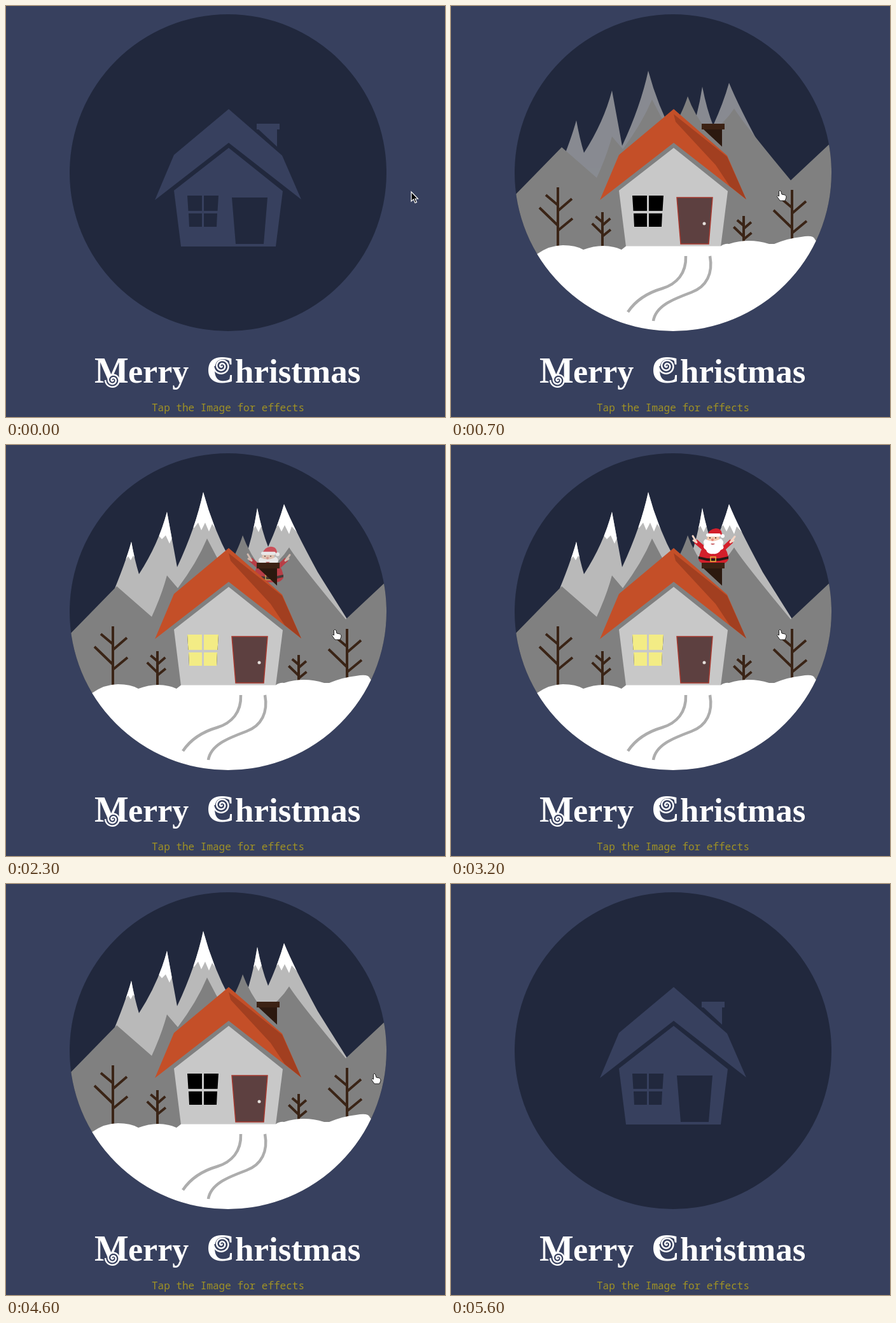
These frames come from a looping animation (690 px wide and 646 px high, 6300 ms). An HTML page:

```html
<!DOCTYPE html>
<html lang="en">
<head>
<meta charset="utf-8">
<title>Merry Christmas</title>
<style>
  html, body { margin: 0; width: 100%; height: 100%; overflow: hidden; background: #37405e; }
  svg { display: block; width: 100%; height: 100%; }
  .title { font-family: "Liberation Serif", serif; font-weight: bold; fill: #fff; }
  .hint { font: 16px "Noto Sans Mono", monospace; fill: #a09224; }
</style>
</head>
<body>
<svg viewBox="0 0 690 646">
  <defs>
    <clipPath id="disc"><circle cx="349" cy="262" r="249"/></clipPath>
    <path id="range" d="M165 240Q188 185 197 152Q202 180 209 203Q240 155 253 105L269 192Q298 130 310 74Q325 130 352 180L372 190Q388 145 395 99Q402 135 412 160Q428 125 437 93Q452 130 490 200L537 275V320H165Z"/>
    <clipPath id="rangeClip"><use href="#range"/></clipPath>
    <path id="roof" d="M350 162L434 235L464 304L350 215L234 305L264 234Z"/>
    <path id="wall" d="M350 223L435 291L424 378H275L264 290Z"/>
    <path id="chimney" d="M394 185H430V194H426V221L397 194H394Z"/>
    <path id="panes" d="M285 298H308V322H286.500ZM311 298H334L332.500 322H311ZM287 326H308V347H288ZM311 326H332L331 347H311Z"/>
    <path id="door" d="M355 301H411L405 374H361Z"/>
    <g id="tree" fill="none" stroke="#3a2416" stroke-width="4">
      <path vector-effect="non-scaling-stroke" d="M0 0V95M-19 12L0 28M-29 32L0 60M22 18L0 37M23 49L0 68"/>
    </g>
  </defs>

  <rect width="690" height="646" fill="#37405e"/>
  <circle cx="349" cy="262" r="249" fill="#21283d"/>

  <!-- unlit house -->
  <g fill="#37405e">
    <use href="#chimney"/><use href="#roof"/><use href="#wall"/>
    <g fill="#21283d"><use href="#panes"/><use href="#door"/></g>
  </g>

  <g clip-path="url(#disc)">
    <g id="scene">
      <g id="peaks">
        <use href="#range" fill="#b9b9b9"/>
        <g id="caps" clip-path="url(#rangeClip)" fill="#fff">
          <path d="M185 150H210L206 182L200 174L196 181L192 175L188 180Z"/>
          <path d="M235 100H270L267 158L261 146L257 155L251 142L245 148L238 140Z"/>
          <path d="M285 70H335V140L324 124L319 136L313 122L307 134L302 122L296 130L285 126Z"/>
          <path d="M380 95H410V142L401 128L397 137L392 127L387 134L380 128Z"/>
          <path d="M418 90H460L462 142L449 128L445 140L438 126L433 136L428 126L418 134Z"/>
        </g>
      </g>
      <path fill="#808080" d="M95 303L174 222L229 270Q245 235 253 205L270 225Q300 185 316 147Q330 175 345 200Q365 165 372 142Q382 170 405 200Q430 185 445 161Q460 185 534 274L600 212V420H95Z"/>
      <use href="#tree" x="168" y="285"/>
      <use href="#tree" x="536" y="289"/>
      <use href="#tree" transform="translate(238 324) scale(.56)"/>
      <use href="#tree" transform="translate(460 330) scale(.54)"/>

      <g id="santa">
        <path d="M398 163L384 151M428 163L441 151" stroke="#d31f2b" stroke-width="7"/>
        <path d="M386 153L380 143M386 153L381 150M439 153L446 144M439 153L444 150" stroke="#f6d5c5" stroke-width="3" stroke-linecap="round"/>
        <path d="M399 156H426Q436 167 436 180Q433 186 425 187H400Q391 186 389 180Q391 166 399 156Z" fill="#d31f2b"/>
        <path d="M389 175Q412 182 436 175V179Q412 186 389 179Z" fill="#251815"/>
        <rect x="408" y="176" width="8" height="7" fill="none" stroke="#e4b73c" stroke-width="1.500"/>
        <circle cx="412" cy="148" r="10" fill="#f4c7ad"/>
        <path d="M400 148Q405 151 411 151Q418 151 424 147Q430 151 427 157Q431 163 424 165Q420 172 412 171Q403 172 401 165Q395 162 398 156Q395 151 400 148Z" fill="#fff"/>
        <path d="M403 143Q405 132 416 131Q426 131 426 142Z" fill="#d31f2b"/>
        <rect x="401" y="139" width="23" height="5" rx="2.500" fill="#fff"/>
        <circle cx="427" cy="143" r="3" fill="#fff"/>
        <circle cx="411" cy="149" r="2" fill="#e58a7c"/>
        <path d="M408 155Q411 158 415 155" fill="#b32b30"/>
        <path d="M406 146H408M415 146H417" stroke="#33231f" stroke-width="1.500"/>
      </g>

      <use href="#chimney" fill="#2c190f"/>
      <rect x="394" y="185" width="36" height="9" fill="#3c2214"/>
      <use href="#roof" fill="#c44f28"/>
      <path fill="#a23f20" d="M350 170L434 237L464 304L438 283L416 250L353 182Z"/>
      <use href="#wall" fill="#c8c8c8"/>
      <use href="#panes"/>
      <use href="#panes" id="light" fill="#f3ec85"/>
      <use href="#door" fill="#5d4040" stroke="#a8392f" stroke-width="1.500"/>
      <circle cx="398" cy="342" r="2.500" fill="#e6e0dc"/>

      <path fill="#fff" d="M100 420L135 390Q155 376 176 376Q196 376 208 383Q240 371 268 383L275 377.500H424Q430 373 437 374Q468 364 500 374L508 374Q530 365 550 363Q570 359 572 367L600 400V520H100Z"/>
      <path fill="none" stroke="#adadad" stroke-width="4.500" d="M369 393C370 420 355 437 332 444C308 451 290 463 278 481M407 393C412 420 402 441 378 450C352 460 322 470 318 495"/>
    </g>
  </g>

  <text class="title" y="592">
    <tspan x="139" font-size="57">M</tspan><tspan x="192" font-size="52">erry</tspan>
    <tspan x="315" font-size="62">C</tspan><tspan x="360" font-size="53">hristmas</tspan>
  </text>
  <g fill="#37405e" stroke="#fff" stroke-width="2.500">
    <path class="curl" data-x="168" data-y="588" data-r="12"/>
    <path class="curl" data-x="339" data-y="566" data-r="13"/>
  </g>
  <text class="hint" x="229" y="637">Tap the Image for effects</text>

  <g id="cursor">
    <path id="arrow" d="M0 0V15L3.500 11.800L6 17.500L8.500 16.400L6 11H10.500Z" stroke="#fff" stroke-width="1.200"/>
    <path id="hand" fill="#fff" stroke="#222" d="M-1.500 1Q0 -1 1.500 1L3 6L8 7Q10 8 10 11L8 16H0L-4.500 9.500Q-4 7 -1.500 9Z"/>
  </g>
</svg>

<script>
const LOOP = 6300, STEP = 100, DROP = 88;
const $ = id => document.getElementById(id);

const clamp = v => Math.max(0, Math.min(1, v));
const ramp = (t, from, to) => clamp((t - from) / (to - from));
const ease = p => 1 - (1 - p) ** 2;

// Rises during the first interval and falls during the second.
const pulse = (t, inFrom, inTo, outFrom, outTo) =>
  ease(ramp(t, inFrom, inTo)) * (1 - ease(ramp(t, outFrom, outTo)));

// time, x, y of the pointer tip
const route = [[100, 637, 292], [600, 517, 290], [4200, 517, 290], [4600, 579, 298], [5100, 652, 283]];

function pointerAt(t) {
  let [, x, y] = route[0];
  for (let i = 1; i < route.length; i++) {
    const [t0, x0, y0] = route[i - 1], [t1, x1, y1] = route[i];
    const p = ramp(t, t0, t1);
    x += (x1 - x0) * p;
    y += (y1 - y0) * p;
  }
  return [x, y];
}

function rise(el, p) {
  el.setAttribute("transform", `translate(0 ${DROP * (1 - p)})`);
  el.setAttribute("opacity", p);
}

function render(t) {
  $("scene").setAttribute("opacity", pulse(t, 200, 600, 4700, 5200));
  rise($("peaks"), pulse(t, 350, 1150, 4700, 5200));
  $("caps").setAttribute("opacity", pulse(t, 900, 1400, 4700, 5000));
  $("light").setAttribute("opacity", pulse(t, 1500, 2100, 4000, 4500));
  rise($("santa"), pulse(t, 2000, 2700, 4000, 4600));

  const [x, y] = pointerAt(t);
  const inside = Math.hypot(x - 349, y - 262) < 249;
  $("cursor").setAttribute("transform", `translate(${x} ${y})`);
  $("cursor").style.display = t < 5600 ? "" : "none";
  $("arrow").style.display = inside ? "none" : "";
  $("hand").style.display = inside ? "" : "none";
}

for (const curl of document.querySelectorAll(".curl")) {
  const { x, y, r } = curl.dataset;
  const points = Array.from({ length: 61 }, (_, i) => {
    const angle = i / 60 * Math.PI * 5, radius = r * i / 60;
    return `${+x + radius * Math.cos(angle)} ${+y + radius * Math.sin(angle)}`;
  });
  curl.setAttribute("d", "M" + points.join("L"));
}

function tick() {
  render(Math.floor(performance.now() % LOOP / STEP) * STEP);
  requestAnimationFrame(tick);
}
tick();
</script>
</body>
</html>
```
